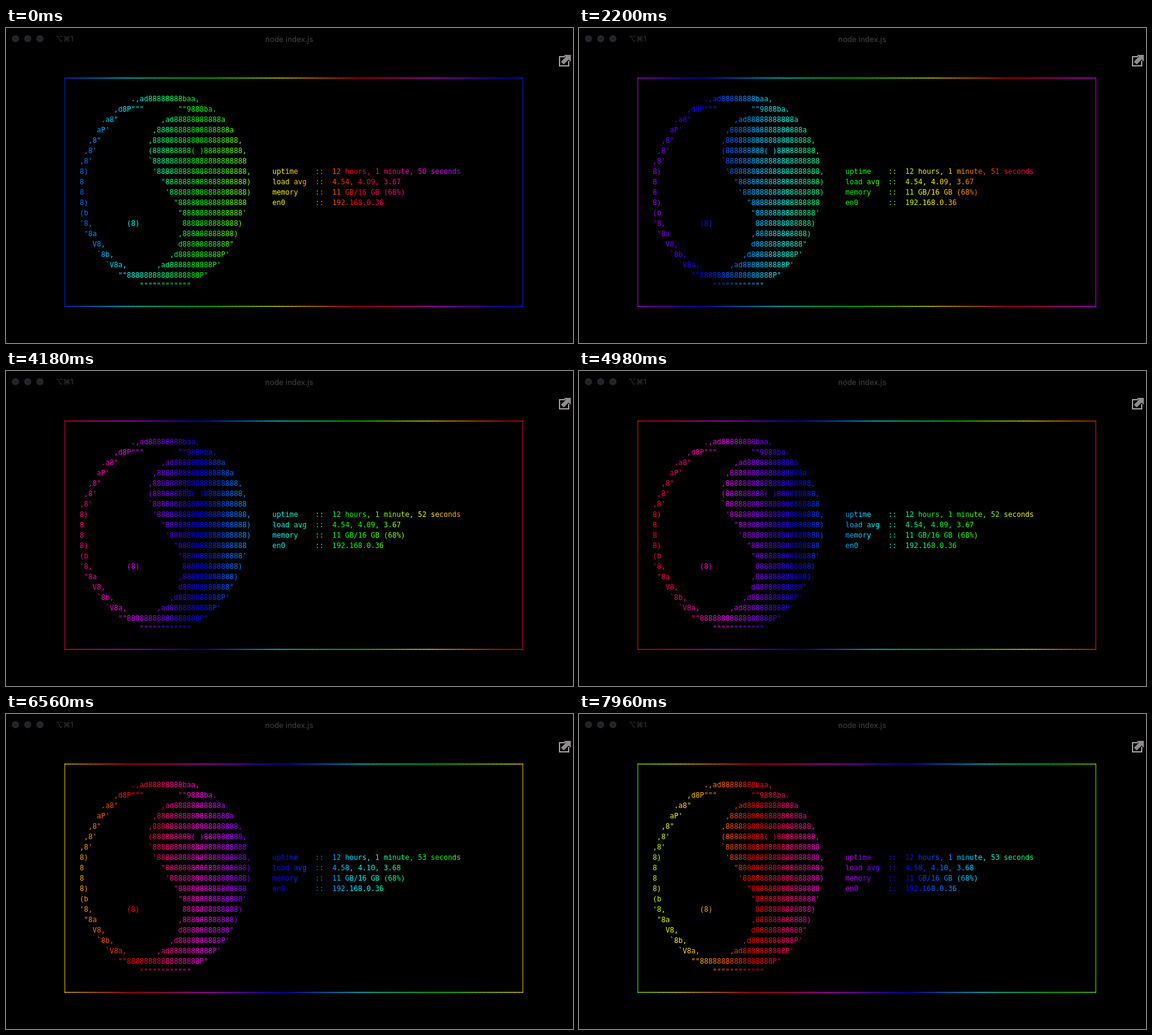
Recreate the animation shown at these times as an HTML page with a canvas. Size 927 px wide and 516 px high, loop 8000 ms.

```html
<!DOCTYPE html>
<html lang="en">
<head>
<meta charset="utf-8">
<title>node index.js</title>
<style>
  html, body { margin: 0; width: 100%; height: 100%; overflow: hidden; background: #000; }
  canvas { display: block; }
</style>
</head>
<body>
<canvas id="stage" width="927" height="516"></canvas>
<script>
const ctx = document.getElementById('stage').getContext('2d');

const LOOP = 8000;
const COLS = 108;
const CELL = 7;
const LINE = 17;
const LEFT = 92.5;
const BASELINE = 120;

// Each entry: row, column, text; 8{n} stands for a run of n eights.
const art = [
  [0, 16, '.,ad8{8}baa,'],
  [1, 12, ',d8P"""'], [1, 27, '""9888ba.'],
  [2, 9, '.a8"'], [2, 23, ',ad8{11}a'],
  [3, 8, "aP'"], [3, 21, ',8{17}a'],
  [4, 6, ',8"'], [4, 20, ',8{20},'],
  [5, 5, ",8'"], [5, 20, '(8{9}( )8{9},'],
  [6, 4, ",8'"], [6, 20, '`8{22}'],
  [7, 4, '8)'], [7, 21, "'8{21},"],
  [8, 4, '8'], [8, 23, '"8{19})'],
  [9, 4, '8'], [9, 24, "'8{18})"],
  [10, 4, '8)'], [10, 26, '"8{16}'],
  [11, 4, '(b'], [11, 27, '"8{14}\''],
  [12, 4, "'8,"], [12, 15, '(8)'], [12, 28, '8{13})'],
  [13, 5, '"8a'], [13, 27, ',8{12})'],
  [14, 7, 'V8,'], [14, 27, 'd8{11}"'],
  [15, 8, '`8b,'], [15, 25, ",d8{10}P'"],
  [16, 10, '`V8a,'], [16, 22, ",ad8{10}P'"],
  [17, 13, '""8{17}P"'],
  [18, 18, '"'.repeat(12)],
].map(([row, col, text]) =>
  [row, col, text.replace(/8\{(\d+)\}/g, (_, n) => '8'.repeat(n))]);

function infoLines(t) {
  const seconds = 50 + Math.floor((t + 2300) / 2600);
  const load = seconds < 53 ? '4.54, 4.09, 3.67' : '4.58, 4.10, 3.68';
  return [
    ['uptime', `12 hours, 1 minute, ${seconds} seconds`],
    ['load avg', load],
    ['memory', '11 GB/16 GB (68%)'],
    ['en0', '192.168.0.36'],
  ].map(([label, value], i) => [7 + i, 49, label.padEnd(10) + '::  ' + value]);
}

// Three screen updates every 140 ms, held for 20, 20 and 100 ms.
function updateCount(t) {
  const cycle = Math.floor((t - 80) / 140);
  const rest = t - 80 - cycle * 140;
  return cycle * 3 + (rest < 20 ? 0 : rest < 40 ? 1 : 2);
}

function drawWindow() {
  ctx.fillStyle = '#000';
  ctx.fillRect(0, 0, 927, 516);

  for (const x of [15.5, 35.5, 55.5]) {
    ctx.fillStyle = '#26252c';
    ctx.beginPath();
    ctx.arc(x, 17.5, 5.8, 0, Math.PI * 2);
    ctx.fill();
    ctx.fillStyle = '#151518';
    ctx.fillRect(x - 2.5, 17, 5, 1.2);
  }

  ctx.fillStyle = '#34323a';
  ctx.font = '12px Inter, "DejaVu Sans", sans-serif';
  ctx.textAlign = 'left';
  ctx.fillText('⌥⌘1', 81, 22);
  ctx.fillStyle = '#444046';
  ctx.font = '12.5px Inter, sans-serif';
  ctx.textAlign = 'center';
  ctx.fillText('node index.js', 463, 22.5);

  ctx.strokeStyle = '#a4a09c';
  ctx.lineWidth = 2;
  ctx.stroke(new Path2D('M914 47H905V62H920V54'));
  ctx.strokeStyle = ctx.fillStyle = '#8e8a90';
  ctx.lineWidth = 6.5;
  ctx.stroke(new Path2D('M909.5 57.5L918 49'));
  ctx.fill(new Path2D('M912 44H923.5V55.5Z'));
}

function drawBorder(colors) {
  const top = 81, bottom = 455, right = 845;
  ctx.globalAlpha = 0.62;
  for (let col = 0; col < COLS; col++) {
    const x = Math.max(96, LEFT + col * CELL);
    const end = Math.min(right, LEFT + (col + 1) * CELL);
    ctx.fillStyle = colors[col];
    ctx.fillRect(x, top, end - x, 2);
    ctx.fillRect(x, bottom, end - x, 2);
  }
  ctx.globalAlpha = 0.72;
  ctx.fillStyle = colors[0];
  ctx.fillRect(95.5, top, 1.3, bottom + 2 - top);
  ctx.fillStyle = colors[COLS - 1];
  ctx.fillRect(right - 0.7, top, 1.3, bottom + 2 - top);
  ctx.globalAlpha = 1;
}

function drawText([row, firstCol, text], colors) {
  [...text].forEach((char, i) => {
    const col = firstCol + i;
    ctx.fillStyle = colors[col];
    ctx.fillText(char, LEFT + col * CELL, BASELINE + row * LINE);
  });
}

function render(t) {
  const hue = 230 + 1.3 * updateCount(t);
  const colors = Array.from({ length: COLS }, (_, col) =>
    `hsl(${hue - 359 * col / (COLS - 1)}, 100%, 50%)`);

  drawWindow();
  drawBorder(colors);
  ctx.font = '11.63px "DejaVu Sans Mono", monospace';
  ctx.textAlign = 'left';
  for (const line of [...art, ...infoLines(t)]) drawText(line, colors);
}

const start = performance.now();
function tick() {
  render((performance.now() - start) % LOOP);
  requestAnimationFrame(tick);
}
tick();
</script>
</body>
</html>
```
